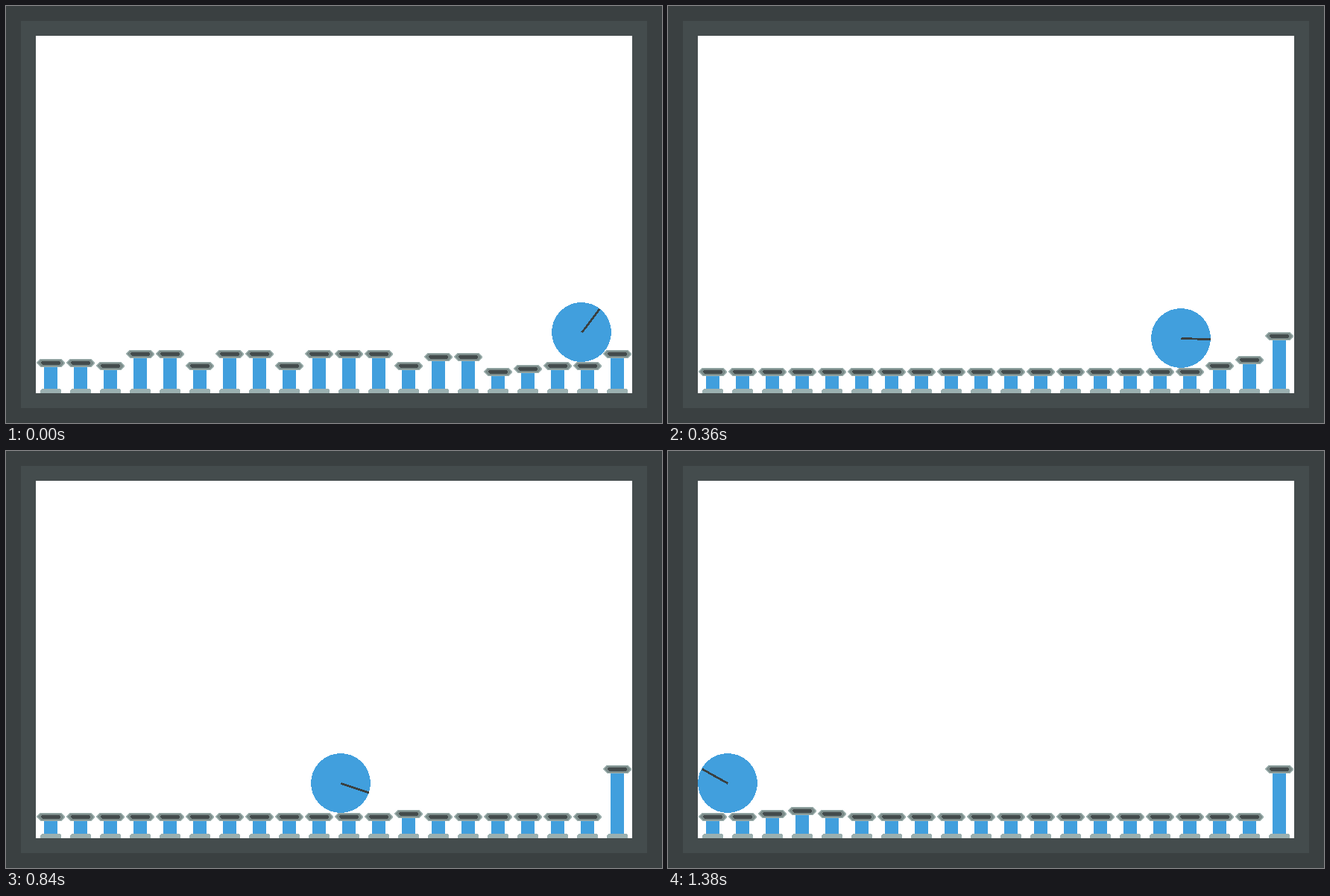
Write an HTML page that moves like this. It is 880 px wide and 560 px high and loops after 1440 ms.

```html
<!DOCTYPE html>
<html lang="en">
<head>
<meta charset="utf-8">
<title>Pistons and ball</title>
<style>
  html, body { margin: 0; width: 100%; height: 100%; overflow: hidden; background: #3a4041; }
  svg { display: block; }
</style>
</head>
<body>
<svg width="880" height="560" viewBox="0 0 880 560" shape-rendering="crispEdges">
  <defs>
    <g id="cap">
      <path d="M-19-1L-14-5H14L19-1V1L14 6H-14L-19 1Z" fill="#9fb2b0"/>
      <path d="M-17-1L-13-4H13L17-1V1L13 5H-13L-17 1Z" fill="#7c8c8a"/>
      <path d="M-13-1L-11-2H11L13-1V1L11 3H-11L-13 1Z" fill="#434b4c"/>
    </g>
    <path id="base" d="M-14 520V516L-12 514H12L14 516V520Z" fill="#9bb0b0"/>
  </defs>
  <rect width="880" height="560" fill="#3a4041"/>
  <rect x="20" y="20" width="840" height="520" fill="#444c4d"/>
  <rect x="40" y="40" width="800" height="480" fill="#fff"/>
  <g id="pistons"></g>
  <g id="ball">
    <circle r="40" fill="#419fdd"/>
    <line id="hand" x2="39.5" stroke="#3a4041" stroke-width="2.8"/>
  </g>
</svg>
<script>
const STEP = 60, STEPS = 24, FLOOR = 491, LIFT = 4, TOP = 16;

// Starting height of each piston, in lifts above the floor
const START = [..."33266266266625501226"].map(Number);

// Ball path as key points: [step, x]
const PATH = [[0, 772], [2, 746], [6, 688], [10, 606], [14, 449], [18, 258], [20, 191], [23, 80]];

// Smooth curve through the key points
function slope(k) {
  const a = PATH[Math.max(0, k - 1)], b = PATH[Math.min(PATH.length - 1, k + 1)];
  return (b[1] - a[1]) / (b[0] - a[0]);
}
function ballX(s) {
  const k = Math.max(1, PATH.findIndex(p => p[0] >= s));
  const [s0, x0] = PATH[k - 1], [s1, x1] = PATH[k];
  const h = s1 - s0, u = (s - s0) / h, ease = u * u * (3 - 2 * u);
  return x0 + (x1 - x0) * ease
    + h * u * (1 - u) * (slope(k - 1) * (1 - u) - slope(k) * u);
}

const pistonX = i => 60 + 40 * i;

// A piston rises just behind the ball and sinks elsewhere; the last one keeps rising
function level(i, s) {
  let n = START[i];
  for (let k = 0; k < s; k++) {
    const gap = pistonX(i) - ballX(k);
    const rising = i === START.length - 1 || (gap >= 21 && gap < 80);
    n = Math.max(0, Math.min(TOP, n + (rising ? 1 : -1)));
  }
  return n;
}

// The ball spins freely until it lands, then rolls
function angle(s) {
  if (s < 2) return 68 * s - 53;
  return 84.8 + (ballX(s) - ballX(2)) / 39.93 * 180 / Math.PI;
}

function add(parent, tag, attrs) {
  const el = document.createElementNS("http://www.w3.org/2000/svg", tag);
  for (const k in attrs) el.setAttribute(k, attrs[k]);
  return parent.appendChild(el);
}

const group = document.getElementById("pistons");
const pistons = START.map((_, i) => {
  const g = add(group, "g", { transform: `translate(${pistonX(i)} 0)` });
  const shaft = add(g, "rect", { x: -9, width: 18, fill: "#419fdd" });
  add(g, "use", { href: "#base" });
  return { shaft, cap: add(g, "use", { href: "#cap" }) };
});
const ball = document.getElementById("ball");
const hand = document.getElementById("hand");

function draw(s) {
  pistons.forEach(({ shaft, cap }, i) => {
    const y = FLOOR - LIFT * level(i, s);
    shaft.setAttribute("y", y);
    shaft.setAttribute("height", 516 - y);
    cap.setAttribute("y", y);
  });
  const y = Math.min(446, 438 + 4 * s);
  ball.setAttribute("transform", `translate(${Math.round(ballX(s))} ${y})`);
  hand.setAttribute("transform", `translate(.5 .5) rotate(${angle(s)})`);
}

let shown = 0;
const begin = performance.now();
function tick() {
  const s = Math.floor(Math.max(0, performance.now() - begin) / STEP) % STEPS;
  if (s !== shown) draw(shown = s);
  requestAnimationFrame(tick);
}
draw(0);
requestAnimationFrame(tick);
</script>
</body>
</html>
```
